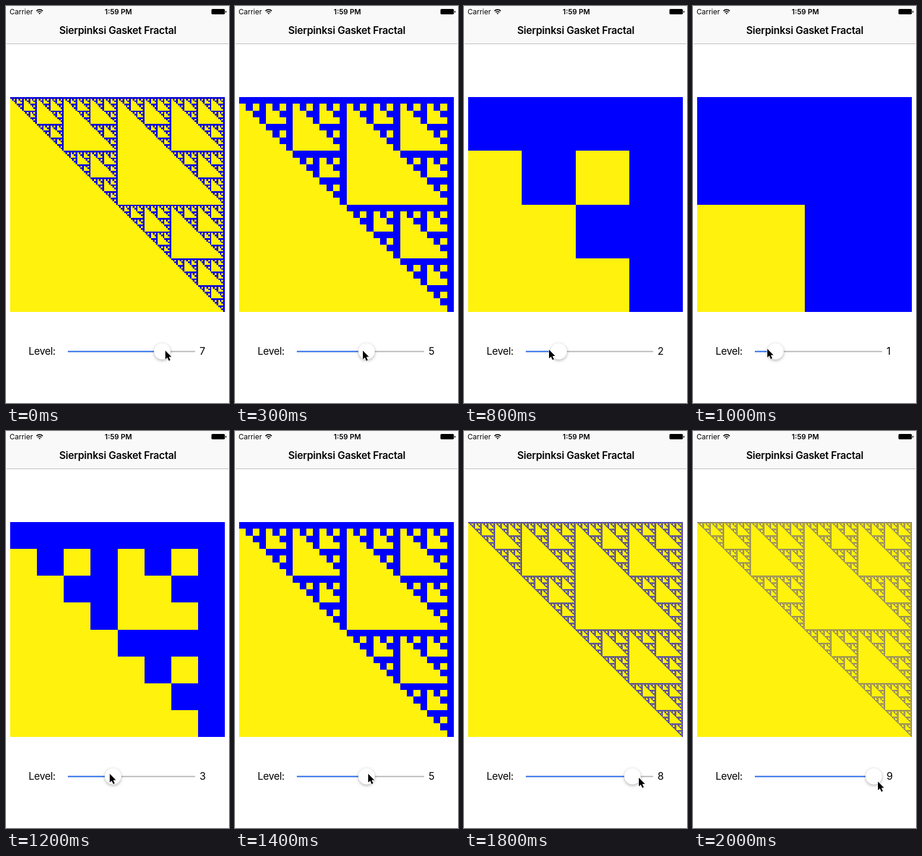
Animation, 375 px wide and 667 px high, one loop 2.1 s. Source, as an HTML page with a canvas:

```html
<!DOCTYPE html>
<html lang="en">
<head>
<meta charset="utf-8">
<title>Sierpinksi Gasket Fractal</title>
<style>
  html, body { margin: 0; width: 100%; height: 100%; overflow: hidden; background: #fff; }
  svg { position: absolute; left: 0; top: 0; }
  canvas { position: absolute; left: 7px; top: 153px; }
  text { font-family: Inter, Roboto, "Liberation Sans", sans-serif; font-size: 17px; }
  .status { font-size: 12px; }
  .bold { font-weight: 600; text-anchor: middle; }
  #thumb { filter: drop-shadow(0 2.5px 2.5px rgba(0, 0, 0, .27)); }
</style>
</head>
<body>
<canvas id="gasket" width="361" height="361"></canvas>
<svg width="375" height="667" viewBox="0 0 375 667">
  <path d="M1 0H374V63H1Z" fill="#f9f9f9"/>
  <path d="M1 63.5H374" stroke="#b9b9b9"/>

  <text class="status" x="6" y="14">Carrier</text>
  <g fill="none" stroke="#000" stroke-width="1.7">
    <path d="M51.2 8.4a7.5 7.5 0 0 1 10.6 0M53.3 10.6a4.5 4.5 0 0 1 6.4 0"/>
    <path d="M56.5 14L54.9 12.3a2.3 2.3 0 0 1 3.2 0Z" fill="#000" stroke="none"/>
  </g>
  <text class="status bold" x="189" y="14">1:59 PM</text>
  <rect x="345.5" y="5" width="22.5" height="9" rx="1.8"/>
  <path d="M369 8a1.7 1.7 0 0 1 0 3.4Z"/>
  <text class="bold" x="188" y="47" letter-spacing="-.25">Sierpinksi Gasket Fractal</text>

  <text x="38" y="585.5" letter-spacing="-.4">Level:</text>
  <path d="M104 580.5H318" stroke="#b5b5b5" stroke-width="2"/>
  <path id="fill" stroke="#2a70f5" stroke-width="2"/>
  <circle id="thumb" cy="580" r="14" fill="#fff" stroke="#000" stroke-opacity=".09" stroke-width=".6"/>
  <text id="value" x="325.5" y="585.5"></text>
  <path id="cursor" d="M0 0V14.6L3.3 11.5L5.8 17L8.3 15.9L5.8 10.6H10.3Z" stroke="#fff" stroke-width="1" paint-order="stroke"/>
</svg>
<script>
const $ = id => document.getElementById(id);
const ctx = $('gasket').getContext('2d');
const SIZE = 361, LOOP = 2100, STEP = 100;

// step, level, cursor x, cursor y
const keys = [
  [0, 7, 268, 579], [3, 5, 215, 579], [6, 3, 161, 579], [10, 1, 125, 576],
  [14, 5, 224, 576], [16, 7, 277, 576], [20, 9, 311, 589]
];

function pose(step) {
  const i = Math.max(1, keys.findIndex(k => k[0] >= step));
  const a = keys[i - 1], b = keys[i];
  const u = (step - a[0]) / (b[0] - a[0]);
  return a.map((v, k) => v + (b[k] - v) * u);
}

function drawGasket(level) {
  const n = 2 ** level, cell = SIZE / n;
  const edge = level < 8 ? i => Math.round(i * cell) : i => i * cell;
  ctx.globalAlpha = 1;
  ctx.fillStyle = '#fff20c';
  ctx.fillRect(0, 0, SIZE, SIZE);
  ctx.globalAlpha = level > 8 ? .8 : 1;
  ctx.fillStyle = level < 7 ? '#00f' : '#1008d8';
  for (let row = 0; row < n; row++) {
    for (let col = row; col < n; col++) {
      if (row & ~col) continue;
      const x = edge(col), y = edge(row);
      ctx.fillRect(x, y, edge(col + 1) - x, edge(row + 1) - y);
    }
  }
}

let shownLevel;
function setLevel(level) {
  if (level === shownLevel) return;
  shownLevel = level;
  const x = 118 + level * 186 / 9;
  $('thumb').setAttribute('cx', x);
  $('fill').setAttribute('d', `M104 580.5H${x}`);
  $('value').textContent = level;
  drawGasket(level);
}

function render(now) {
  const [, level, x, y] = pose(Math.floor(now % LOOP / STEP));
  setLevel(Math.round(level));
  $('cursor').setAttribute('transform', `translate(${x} ${y})`);
}

const start = performance.now();
function tick() {
  render(performance.now() - start);
  requestAnimationFrame(tick);
}
tick();
</script>
</body>
</html>
```
